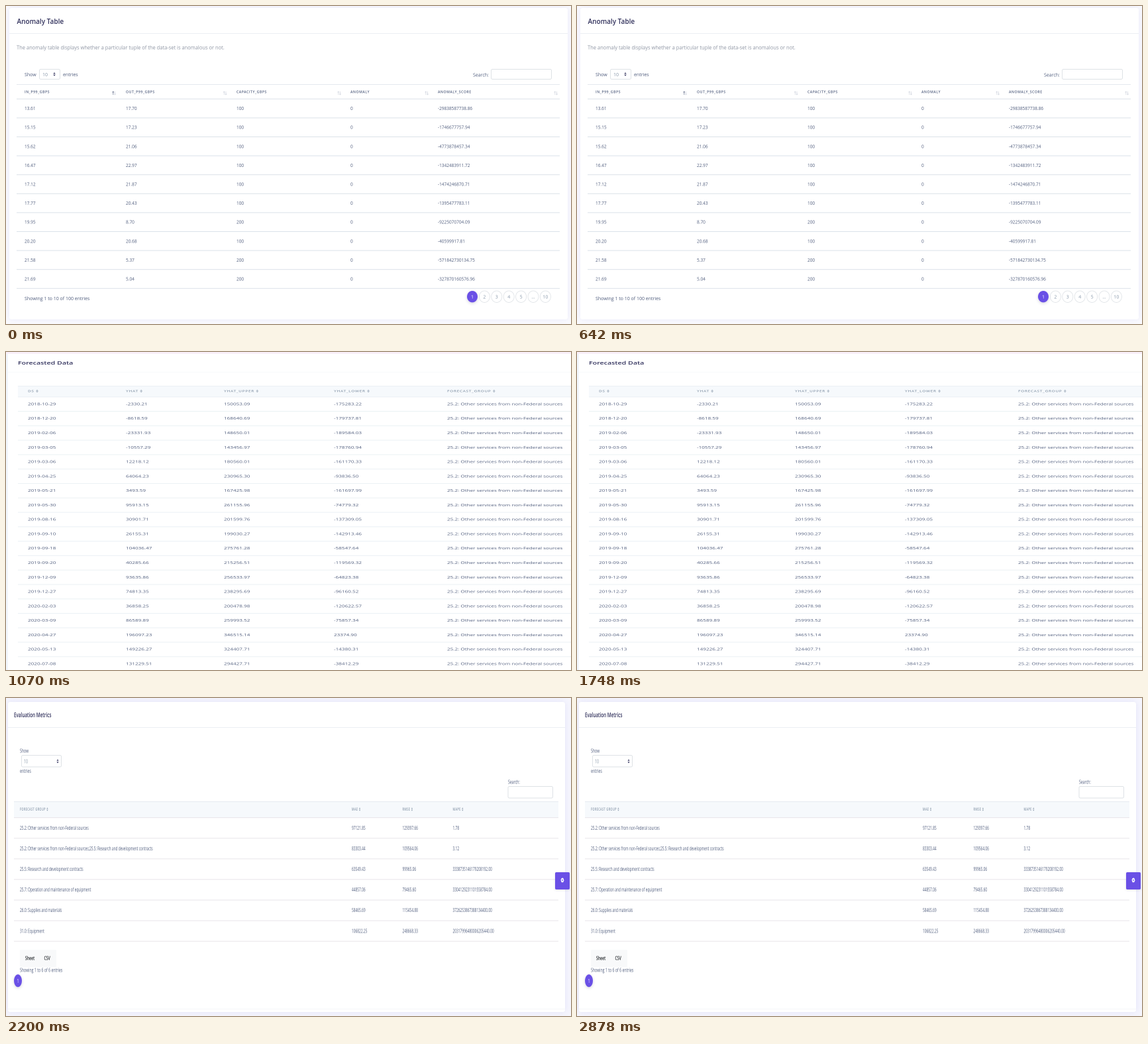
Write an HTML page with a canvas that moves like this. It is 853 px wide and 480 px high and loops after 3.33 s.

```html
<!DOCTYPE html>
<html lang="en">
<head>
<meta charset="utf-8">
<title>Data tables</title>
<style>
  html, body { margin: 0; width: 100%; height: 100%; overflow: hidden; background: #fff; }
  canvas { display: block; width: 853px; height: 480px; }
</style>
</head>
<body>
<canvas id="stage"></canvas>
<script>
const WIDTH = 853, HEIGHT = 480;
const DENSITY = 2; // finer backing store keeps small text at its exact position
const canvas = document.getElementById('stage');
canvas.width = WIDTH * DENSITY;
canvas.height = HEIGHT * DENSITY;
const ctx = canvas.getContext('2d');
ctx.scale(DENSITY, DENSITY);

const INK = '#32325d', BODY = '#525f7f', MUTED = '#8898aa', PURPLE = '#6a50e6';

const ANOMALIES = `
13.61 17.70 100 0 -29838587738.86
15.15 17.23 100 0 -1746677757.94
15.62 21.06 100 0 -4773878457.34
16.47 22.97 100 0 -1342483911.72
17.12 21.87 100 0 -1474246870.71
17.77 20.43 100 0 -1395477783.11
19.95 8.70 200 0 -9225070704.09
20.20 20.68 100 0 -40599917.81
21.58 5.37 200 0 -571842730134.75
21.69 5.04 200 0 -327870160576.96`;

const FORECASTS = `
2018-10-29 -2330.21 150053.09 -175283.22
2018-12-20 -8618.59 168640.69 -179737.81
2019-02-06 -23331.93 148650.01 -189584.03
2019-03-05 -10557.29 143456.97 -178760.94
2019-03-06 12218.12 180560.01 -161170.33
2019-04-25 64064.23 230965.30 -93836.50
2019-05-21 3493.59 167425.98 -161697.99
2019-05-30 95913.15 261155.96 -74779.32
2019-08-16 30901.71 201599.76 -137309.05
2019-09-10 26155.31 199030.27 -142913.46
2019-09-18 104036.47 275761.28 -58547.64
2019-09-20 40285.66 215256.51 -119569.32
2019-12-09 93635.86 256533.97 -64823.38
2019-12-27 74813.35 238295.69 -96160.52
2020-02-03 36858.25 200478.98 -120622.57
2020-03-09 86589.89 259993.52 -75857.34
2020-04-27 196097.23 346515.14 23374.90
2020-05-13 149226.27 324407.71 -14380.31
2020-07-08 131229.51 294427.71 -38412.29`;

const SERVICES = '25.2: Other services from non-Federal sources';
const METRICS = [
  [SERVICES, '97121.85', '129397.66', '1.78'],
  [SERVICES + ';25.5: Research and development contracts', '83303.44', '109564.06', '3.12'],
  ['25.5: Research and development contracts', '63549.43', '99965.06', '3338735146179208192.00'],
  ['25.7: Operation and maintenance of equipment', '44857.06', '79465.60', '3304129231101558784.00'],
  ['26.0: Supplies and materials', '58465.69', '115454.88', '3726253867388134400.00'],
  ['31.0: Equipment', '106822.25', '248668.33', '20317996480006205440.00']
];

const parse = block => block.trim().split('\n').map(line => line.split(' '));

// Each page is shown at its own aspect ratio.
let sx = 1, sy = 1;
function setPage(scaleX, scaleY, background) {
  sx = scaleX;
  sy = scaleY;
  rect(0, 0, WIDTH, HEIGHT, background);
}

function rect(x, y, w, h, color) {
  ctx.fillStyle = color;
  ctx.fillRect(x, y, w, h);
}

function box(x, y, w, h, radius, fill, stroke) {
  ctx.beginPath();
  ctx.roundRect(x, y, w, h, radius);
  if (fill) { ctx.fillStyle = fill; ctx.fill(); }
  if (stroke) { ctx.strokeStyle = stroke; ctx.lineWidth = 1; ctx.stroke(); }
}

function withShadow(color, blur, offset, paint) {
  ctx.save();
  ctx.shadowColor = color;
  ctx.shadowBlur = blur * DENSITY;
  ctx.shadowOffsetY = offset * DENSITY;
  paint();
  ctx.restore();
}

function card(x, y, w, h) {
  withShadow('rgba(110,110,200,0.13)', 10, 0, () => box(x, y, w, h, 3, '#fff'));
}

// Draws text whose capitals are centred on y; returns its right edge.
function text(str, x, y, size, color, { weight = 400, spacing = 0, align = 'left' } = {}) {
  ctx.save();
  ctx.translate(x, y);
  ctx.scale(sx, sy);
  ctx.font = `${weight} ${size}px "Open Sans", sans-serif`;
  ctx.letterSpacing = spacing + 'px';
  ctx.textAlign = align;
  ctx.fillStyle = color;
  ctx.fillText(str, 0, size * 0.36);
  const right = x + ctx.measureText(str).width * sx;
  ctx.restore();
  return right;
}

const title = (str, x, y, size = 17) => text(str, x, y, size, INK, { weight: 600 });
const heading = (str, x, y, color) => text(str, x, y, 10.4, color, { weight: 600, spacing: 1 });

function carets(x, y, w, h, color) {
  ctx.fillStyle = color;
  for (const dir of [-1, 1]) {
    ctx.beginPath();
    ctx.moveTo(x - w / 2, y + dir * h * 0.12);
    ctx.lineTo(x + w / 2, y + dir * h * 0.12);
    ctx.lineTo(x, y + dir * h / 2);
    ctx.fill();
  }
}

function arrow(x, y, dir, color) {
  ctx.strokeStyle = color;
  ctx.lineWidth = 0.8;
  ctx.beginPath();
  ctx.moveTo(x, y - 2.5 * dir);
  ctx.lineTo(x, y + 2.5 * dir);
  ctx.moveTo(x - 1.2, y + 1.1 * dir);
  ctx.lineTo(x, y + 2.5 * dir);
  ctx.lineTo(x + 1.2, y + 1.1 * dir);
  ctx.stroke();
}

function sortableHeadings(names, columns, y) {
  names.forEach((name, i) => {
    const right = heading(name, columns[i], y, MUTED);
    carets(right + 7 * sx, y, 6 * sx, 9 * sy, MUTED);
  });
}

function rows(data, columns, y, pitch) {
  data.forEach((cells, r) =>
    cells.forEach((cell, c) => text(cell, columns[c], y + r * pitch, 13, BODY)));
}

function rules(x, w, y, pitch, count, color) {
  for (let i = 0; i < count; i++) rect(x, y + i * pitch, w, 1, color);
}

function pageButton(label, x, y, active) {
  ctx.beginPath();
  ctx.ellipse(x, y, 16 * sx, 16 * sy, 0, 0, 2 * Math.PI);
  if (active) {
    withShadow('rgba(50,50,93,0.2)', 4, 1.5, () => {
      ctx.fillStyle = PURPLE;
      ctx.fill();
    });
  } else {
    ctx.strokeStyle = '#dee2e6';
    ctx.lineWidth = 0.8;
    ctx.stroke();
  }
  text(label, x, y, 14, active ? '#fff' : MUTED, { align: 'center' });
}

function anomalyPage() {
  setPage(0.5, 0.546, '#fbfbff');
  card(5, 3, 843, 470);
  title('Anomaly Table', 16.5, 23, 20);
  rect(5, 41, 843, 1, '#eceef3');
  text('The anomaly table displays whether a particular tuple of the data-set is anomalous or not.',
    16, 62.5, 15, '#9097a5');

  text('Show', 28, 103, 14, BODY);
  box(50.5, 95.5, 31, 15, 2, '#fff', '#dee2e6');
  text('10', 55, 103, 14, MUTED);
  carets(73, 103, 3.4, 5.5, INK);
  text('entries', 86, 103, 14, BODY);
  text('Search:', 705, 103.5, 14, BODY);
  box(732.5, 95.5, 91, 15, 2, '#fff', '#dee2e6');

  const columns = [28, 181, 348, 520, 652];
  rect(16, 118, 820, 1, '#e4e8ee');
  ['IN_P99_GBPS', 'OUT_P99_GBPS', 'CAPACITY_GBPS', 'ANOMALY', 'ANOMALY_SCORE']
    .forEach((name, i) => heading(name, columns[i], 129.5, BODY));
  [163, 330.5, 503, 635, 830].forEach((x, i) => {
    arrow(x - 1.2, 131.5, -1, i ? '#d5d9e2' : '#737d96');
    arrow(x + 1.5, 131.5, 1, '#d5d9e2');
  });
  rules(16, 820, 139.8, 28.6, 11, '#dbe2e9');
  rows(parse(ANOMALIES), columns, 154.5, 28.6);

  text('Showing 1 to 10 of 100 entries', 28, 441, 14, BODY);
  ['1', '2', '3', '4', '5', '…', '10']
    .forEach((label, i) => pageButton(label, 704 + i * 18.4, 438.7, i === 0));
}

function forecastPage() {
  setPage(0.626, 0.414, '#f1f6fc');
  rect(0, 0, WIDTH, 3, '#faf0fa');
  rect(3, 3, 850, 477, '#fff');
  title('Forecasted Data', 18, 16.5);
  rect(3, 30, 850, 1, '#f8f9fb');

  const columns = [33, 181, 329, 495, 666];
  rect(18, 51, 835, 17, '#f6f9fc');
  rect(18, 51, 835, 1, '#eceff4');
  sortableHeadings(['DS', 'YHAT', 'YHAT_UPPER', 'YHAT_LOWER', 'FORECAST_GROUP'], columns, 59);
  rules(18, 835, 67.3, 21.78, 19, '#ebf1f5');
  rows(parse(FORECASTS).map(cells => [...cells, SERVICES]), columns, 78.5, 21.78);
}

function gear(x, y) {
  ctx.fillStyle = '#fff';
  ctx.beginPath();
  for (let i = 0; i < 32; i++) {
    const a = i * Math.PI / 16, r = i % 4 < 2 ? 1 : 0.8;
    ctx.lineTo(x + 2.5 * r * Math.cos(a), y + 3.8 * r * Math.sin(a));
  }
  ctx.fill();
  ctx.beginPath();
  ctx.ellipse(x, y, 0.8, 1.2, 0, 0, 2 * Math.PI);
  ctx.fillStyle = PURPLE;
  ctx.fill();
}

function metricsPage() {
  setPage(0.372, 0.594, '#f6f6fe');
  card(3, 6, 841, 468);
  title('Evaluation Metrics', 12, 25.5);
  rect(3, 44, 841, 1, '#eceef3');

  text('Show', 21, 79.5, 14, BODY);
  box(23.5, 86.5, 60, 17.5, 2, '#fff', '#dee2e6');
  text('10', 27, 95.5, 14, MUTED);
  carets(78, 95.5, 3, 6, INK);
  text('entries', 21, 110, 14, BODY);
  text('Search:', 758, 126.5, 14, BODY);
  box(758, 133.5, 67.5, 17.5, 2, '#fff', '#dee2e6');

  const columns = [21, 522, 598.5, 674.5];
  rect(12, 156, 822, 25, '#f6f9fc');
  rect(12, 156, 822, 1, '#e6ebf1');
  sortableHeadings(['FORECAST GROUP', 'MAE', 'RMSE', 'MAPE'], columns, 168);
  rules(12, 822, 180.1, 31.1, 7, '#e8e5ea');
  rows(METRICS, columns, 196, 31.1);

  box(21, 380, 55, 26, 2, '#f8f9fa');
  text('Sheet', 29, 392.5, 14, '#212529', { weight: 600 });
  text('CSV', 57.5, 392.5, 14, '#212529', { weight: 600 });
  text('Showing 1 to 6 of 6 entries', 21, 410.5, 14, BODY);
  pageButton('1', 18, 426.8, true);
  rect(3, 469, 841, 1, '#f5f6f9');

  withShadow('rgba(50,50,93,0.15)', 3, 1, () => box(829, 263, 22, 26, 2, PURPLE));
  gear(840, 275);
}

const LOOP = 3330;
function draw(now) {
  const t = now % LOOP;
  if (t < 1070) anomalyPage();
  else if (t < 2200) forecastPage();
  else metricsPage();
}

const start = performance.now();
function tick() {
  draw(performance.now() - start);
  requestAnimationFrame(tick);
}
tick();
</script>
</body>
</html>
```
